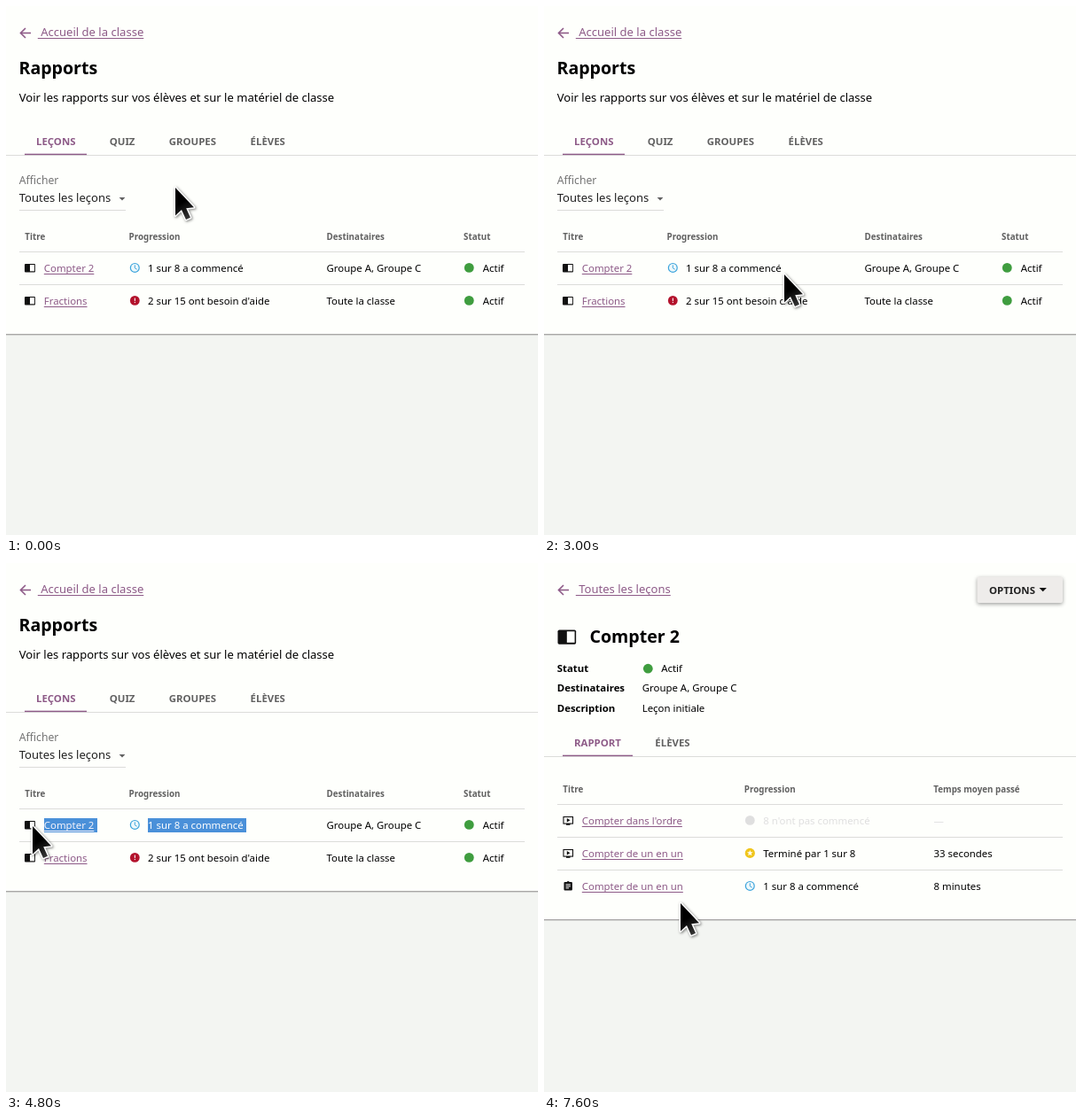
An HTML page with a canvas that plays this animation: 600 by 597 pixels, repeating every 8000 ms.

```html
<!DOCTYPE html>
<html lang="fr">
<head>
<meta charset="utf-8">
<title>Rapports</title>
<style>
html, body { margin: 0; width: 100%; height: 100%; overflow: hidden; background: #f3f5f2; }
canvas { display: block; }
</style>
</head>
<body>
<canvas id="stage" width="600" height="597"></canvas>
<script>
const ctx = document.getElementById('stage').getContext('2d');
const LOOP = 8000, STEP = 200;
const PURPLE = '#8d5a87', INK = '#111', GREY = '#616161', GREEN = '#3f9d3f', BLUE = '#3ba4dc';
const PAPER = '#fefffc', SELECT = '#4a90d9';
const BODY = 13.05, CELL = 11.42, HEAD = 9.79, TITLE = 19.57;

// time, pointer x, pointer y, hand?
const POINTER = [
  [0, 190, 203, 0], [600, 165, 190, 0], [800, 112, 171, 0], [1000, 78, 160, 1], [1200, 74, 161, 1],
  [2200, 74, 163, 1], [2400, 115, 194, 0], [2600, 192, 250, 0], [2800, 250, 290, 0],
  [3000, 270, 301, 0], [3200, 276, 299, 0], [3400, 277, 296, 0], [3600, 238, 283, 0],
  [3800, 168, 277, 0], [4000, 114, 290, 0], [4200, 75, 289, 0], [4400, 45, 289, 1],
  [4600, 31, 293, 0], [4800, 29, 295, 0], [5400, 36, 292, 0], [5600, 62, 294, 1],
  [5800, 70, 297, 1], [7200, 86, 312, 0], [7400, 132, 358, 0], [7600, 153, 382, 0]
];

function rect(x, y, w, h, color) {
  ctx.fillStyle = color;
  ctx.fillRect(x, y, w, h);
}

function text(str, x, y, size, color = '#000', weight = 400) {
  ctx.font = `${weight} ${size}px "Noto Sans", sans-serif`;
  ctx.fillStyle = color;
  ctx.fillText(str, x, y);
  return ctx.measureText(str).width;
}

const bold = (str, x, y, size, color = '#000') => text(str, x, y, size, color, 700);

function link(str, x, y, size, color = PURPLE, line = color) {
  const w = text(str, x, y, size, color);
  rect(x, y + 2, w, 1, line);
}

function poly(points, color) {
  ctx.beginPath();
  points.forEach(([x, y]) => ctx.lineTo(x, y));
  ctx.closePath();
  ctx.fillStyle = color;
  ctx.fill();
}

function dot(x, y, r, color) {
  ctx.beginPath();
  ctx.arc(x, y, r, 0, Math.PI * 2);
  ctx.fillStyle = color;
  ctx.fill();
}

function stroke(points, color, width) {
  ctx.beginPath();
  points.forEach(([x, y], i) => i ? ctx.lineTo(x, y) : ctx.moveTo(x, y));
  ctx.strokeStyle = color;
  ctx.lineWidth = width;
  ctx.stroke();
}

const caret = (x, y, r, color) => poly([[x - r, y], [x + r, y], [x, y + r]], color);

function clock(x, y) {
  dot(x, y, 5.5, BLUE);
  dot(x, y, 4.3, '#eef8fb');
  stroke([[x, y - 3], [x, y + .3], [x + 2.3, y + 1.8]], BLUE, 1);
}

function alertIcon(x, y) {
  dot(x, y, 5.4, '#b3122c');
  rect(x - .5, y - 2.8, 1.1, 3.3, '#fff');
  rect(x - .5, y + 1.5, 1.1, 1.2, '#fff');
}

function star(x, y) {
  dot(x, y, 5.6, '#f0c61c');
  const points = Array.from({ length: 10 }, (_, i) => {
    const a = i * Math.PI / 5 - Math.PI / 2, r = i % 2 ? 1.5 : 3.5;
    return [x + r * Math.cos(a), y + r * Math.sin(a)];
  });
  poly(points, '#fff');
}

function book(x, y, s) {
  ctx.save();
  ctx.translate(x, y);
  ctx.scale(s, s);
  ctx.beginPath();
  ctx.roundRect(0, 0, 12, 9.4, 1);
  ctx.fillStyle = INK;
  ctx.fill();
  rect(6, 1, 5.1, 7.3, PAPER);
  ctx.restore();
}

function video(x, y) {
  ctx.strokeStyle = INK;
  ctx.lineWidth = 1.1;
  ctx.strokeRect(x + .5, y + .5, 10.5, 7.6);
  rect(x + 3.5, y + 8, 4.5, 1.8, INK);
  poly([[x + 4.3, y + 2.1], [x + 8, y + 4.3], [x + 4.3, y + 6.5]], INK);
}

function clipboard(x, y) {
  dot(x + 4.7, y + 1.5, 1.6, INK);
  ctx.beginPath();
  ctx.roundRect(x, y + 1, 9.4, 9.6, 1);
  ctx.fillStyle = INK;
  ctx.fill();
  [[3.4, 5.4], [5.4, 5.4], [7.4, 3.6]].forEach(([dy, w]) => rect(x + 2, y + dy, w, 1, '#fff'));
}

function paper(bottom) {
  rect(0, 0, 600, 597, '#f3f5f2');
  rect(0, 0, 600, bottom, PAPER);
  rect(0, bottom - 1, 600, 1, '#a9a7a7');
  rect(0, bottom, 600, 1, '#d3d4d2');
}

function backLink(str) {
  ctx.lineCap = 'butt';
  stroke([[16.5, 30.5], [28, 30.5]], PURPLE, 1.6);
  stroke([[22, 25], [16.5, 30.5], [22, 36]], PURPLE, 1.6);
  link(' ' + str, 35.8, 34, BODY);
}

function tabs(items, y, width) {
  rect(0, y, 600, 1, '#dcdcda');
  items.forEach(([str, x], i) => bold(str, x, y - 11, CELL, i ? GREY : PURPLE));
  rect(21, y - 1.3, width, 1.4, PURPLE);
}

const headers = (items, y) => items.forEach(([str, x]) => bold(str, x, y, HEAD, GREY));
const rule = y => rect(15, y, 570, 1, '#dcdcda');

function status(x, y) {
  dot(x, y, 5.4, GREEN);
}

// Repaints a piece of text as selected from `from` to the end of its box.
function selected(from, left, right, paint) {
  const x = Math.max(from, left);
  if (x >= right) return;
  ctx.save();
  ctx.beginPath();
  ctx.rect(x, 288, right - x, 16);
  ctx.clip();
  rect(x, 288, right - x, 16, SELECT);
  paint();
  ctx.restore();
}

function reports(t, px, hand) {
  paper(371);
  backLink('Accueil de la classe');
  bold('Rapports', 14.5, 77, TITLE);
  text('Voir les rapports sur vos élèves et sur le matériel de classe', 14.7, 108, BODY);
  if (hand && t < 3000) {
    ctx.beginPath();
    ctx.roundRect(21, 138, 70, 30, [2, 2, 0, 0]);
    ctx.fillStyle = '#dededc';
    ctx.fill();
  }
  tabs([['LEÇONS', 34], ['QUIZ', 116.7], ['GROUPES', 183.7], ['ÉLÈVES', 275.6]], 168, 70);

  text('Afficher', 14.7, 201, 12.23, '#757575');
  text('Toutes les leçons', 14.7, 221, BODY, '#212121');
  caret(131, 216, 3.4, GREY);
  rect(15, 230, 120, 1, '#dcdcda');

  headers([['Titre', 21.3], ['Progression', 138.6], ['Destinataires', 361.5], ['Statut', 516]], 264);
  rule(277);
  rule(314);
  book(21, 291, 1);
  book(21, 328, 1);
  link('Compter 2', 42.8, 300, CELL);
  link('Fractions', 42.8, 337, CELL);
  clock(145.3, 295.4);
  alertIcon(145.3, 332.4);
  text('1 sur 8 a commencé', 160, 300, CELL);
  text("2 sur 15 ont besoin d'aide", 160, 337, CELL);
  text('Groupe A, Groupe C', 361.5, 300, CELL);
  text('Toute la classe', 361.5, 337, CELL);
  [295.4, 332.4].forEach(y => {
    status(522.3, y);
    text('Actif', 537.8, y + 4.6, CELL);
  });

  if (t >= 3400) {
    const from = t >= 4400 ? 43 : px;
    selected(from, 160, 271, () => text('1 sur 8 a commencé', 160, 300, CELL, '#fff'));
    selected(from, 43, 103, () => link('Compter 2', 42.8, 300, CELL, '#f4f2fa', hand ? '#4d3a78' : '#f4f2fa'));
  }
}

function lesson() {
  paper(403);
  backLink('Toutes les leçons');

  ctx.save();
  ctx.shadowColor = 'rgba(0,0,0,.38)';
  ctx.shadowBlur = 4;
  ctx.shadowOffsetY = 1.5;
  ctx.beginPath();
  ctx.roundRect(488.5, 15.5, 96.5, 29.5, 2);
  ctx.fillStyle = '#eeecea';
  ctx.fill();
  ctx.restore();
  bold('OPTIONS', 502, 35, CELL, '#212121');
  caret(562.7, 28, 4.2, INK);

  book(15.5, 75.5, 1.72);
  bold('Compter 2', 51.5, 90, TITLE);
  bold('Statut', 14.7, 123, CELL);
  bold('Destinataires', 14.7, 145, CELL);
  bold('Description', 14.7, 168, CELL);
  status(117.3, 119.2);
  text('Actif', 132.2, 123, CELL);
  text('Groupe A, Groupe C', 110.7, 145, CELL);
  text('Leçon initiale', 110.7, 168, CELL);
  tabs([['RAPPORT', 34], ['ÉLÈVES', 125.3]], 218, 79);

  headers([['Titre', 21.3], ['Progression', 225.8], ['Temps moyen passé', 439.3]], 259);
  [272, 309, 346].forEach(rule);
  video(21.5, 286);
  video(21.5, 323);
  clipboard(22.5, 359);
  link("Compter dans l'ordre", 42.8, 295, CELL);
  link('Compter de un en un', 42.8, 332, CELL);
  link('Compter de un en un', 42.8, 369, CELL);
  dot(232.3, 290.4, 5.4, '#dfdfdf');
  star(232.3, 327.4);
  clock(232.3, 364.4);
  text("8 n'ont pas commencé", 247.3, 295, CELL, '#dfdfdf');
  text('Terminé par 1 sur 8', 247.3, 332, CELL);
  text('1 sur 8 a commencé', 247.3, 369, CELL);
  text('—', 439.5, 295, CELL, '#dfdfdf');
  text('33 secondes', 439.5, 332, CELL);
  text('8 minutes', 439.5, 369, CELL);
}

const arrowShape = new Path2D('M1 2V33.5L8 27L13 38L18 35.8L13.2 25.2L22 24.3Z');
const handShape = new Path2D(
  'M-2.5 2Q0 -1 2.5 2V9.5Q5 8 7.5 10Q10 9 12.5 11Q15 10 17.5 12.5Q19.5 12 19.5 15' +
  'V20Q19.5 23 17 26V29.5H0V26L-8 16.5Q-8.5 12.5 -5 13L-2.5 16Z');

function cursor(x, y, hand) {
  const shape = hand ? handShape : arrowShape;
  ctx.save();
  ctx.translate(x, y);
  ctx.lineJoin = 'round';
  ctx.save();
  ctx.shadowColor = 'rgba(0,0,0,.5)';
  ctx.shadowBlur = 3;
  ctx.shadowOffsetX = ctx.shadowOffsetY = 1;
  ctx.lineWidth = 3;
  ctx.strokeStyle = '#fff';
  ctx.stroke(shape);
  ctx.restore();
  const shade = ctx.createLinearGradient(0, 0, 20, 36);
  shade.addColorStop(.5, '#000');
  shade.addColorStop(1, hand ? '#000' : '#3a3a3a');
  ctx.fillStyle = shade;
  ctx.fill(shape);
  if (hand) [2.7, 7.6, 12.6].forEach(fx => stroke([[fx, 10], [fx, 16]], '#ddd', .8));
  ctx.restore();
}

function draw(now) {
  const t = Math.floor(now % LOOP / STEP) * STEP;
  const [, x, y, hand] = POINTER.findLast(p => p[0] <= t);
  if (t < 7200) reports(t, x, hand);
  else lesson();
  cursor(x, y, hand);
}

const start = performance.now();
function tick() {
  draw(performance.now() - start);
  requestAnimationFrame(tick);
}
tick();
</script>
</body>
</html>
```
